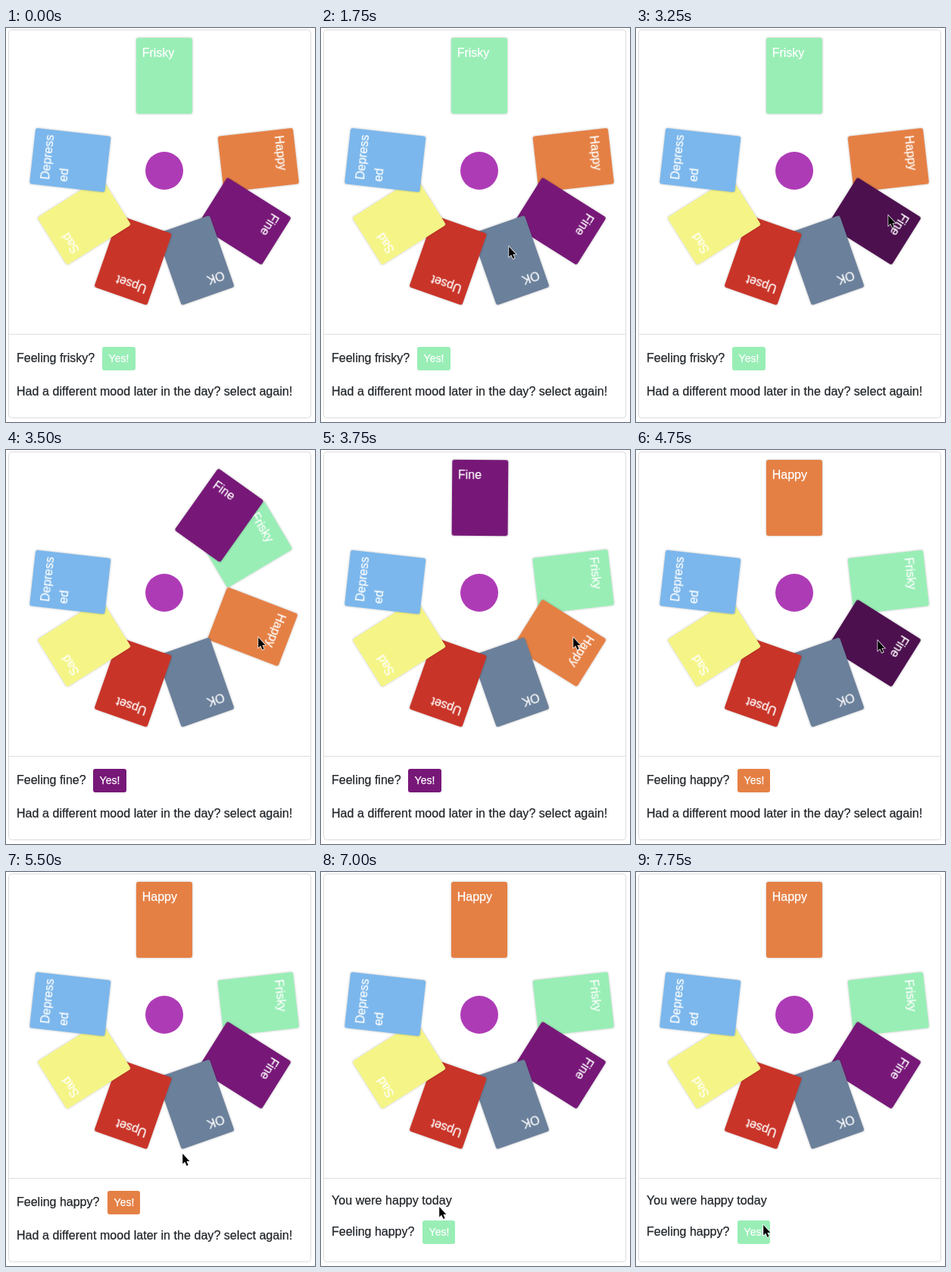
Write an HTML page that moves like this. It is 408 px wide and 519 px high and loops after 8000 ms.

```html
<!DOCTYPE html>
<html lang="en">
<head>
<meta charset="utf-8">
<title>Mood wheel</title>
<style>
  html, body { margin: 0; height: 100%; overflow: hidden; background: #fff; }
  svg { display: block; width: 100vw; height: 100vh; font: 16px "Liberation Sans", Arial, sans-serif; }
  text { fill: #212529; stroke: #212529; stroke-width: .25px; }
  .card { filter: drop-shadow(0 0 1.5px #0004); }
  .card text, #yes text { fill: #fff; stroke: #fff; }
  #note { letter-spacing: .05px; }
  #yes text { font-size: 14px; }
</style>
</head>
<body>
<svg viewBox="0 0 408 519">
  <rect x="3.5" y="2.5" width="399" height="511" rx="4" fill="#fff" stroke="#dcdcdc"/>
  <path d="M4 403.5H402" stroke="#dfdfdf"/>
  <circle cx="209" cy="188" r="25" fill="#ae3bb6"/>
  <g id="wheel"></g>
  <text id="note" x="14"></text>
  <text id="ask" x="14"></text>
  <g id="yes"><rect height="31" rx="3"/><text x="8.6" y="20">Yes!</text></g>
  <path id="cursor" d="M1.2 2V15.4L4.2 12.7 6.5 18 8.6 17.1 6.4 11.9H10.4Z"
    fill="#000" stroke="#fff" stroke-width="1.4" paint-order="stroke"/>
</svg>
<script>
const LOOP = 8000, STEP = 250, TURN = 500, FADE = 150;
const FINE = 2;
const moods = [
  ['Frisky', [153, 238, 182]], ['Happy', [229, 128, 69]], ['Fine', [119, 24, 120]],
  ['OK', [107, 128, 155]], ['Upset', [201, 52, 40]], ['Sad', [245, 245, 135]],
  ['Depress|ed', [123, 183, 236]]
];
// Left edge and width of the button after each question
const buttons = [[127, 44], [134, 43], [115, 44]];

// Each pick puts one card on top; the others keep their order around the wheel.
const picks = [
  { at: -LOOP, mood: 0, slots: [0, 1, 2] },
  { at: 3290, mood: 2, slots: [1, 2, 0] },
  { at: 4217, mood: 1, slots: [1, 0, 2] }
];
const SAVED = 7000;

// time, x, y
const trail = [
  [500, 223, 14], [750, 227, 34], [1000, 243, 237], [1250, 243, 251], [1500, 246, 285],
  [1750, 247, 286], [2750, 270, 287], [3000, 327, 250], [3250, 332, 245], [4000, 326, 248],
  [4250, 318, 249], [5000, 325, 206], [5250, 322, 205], [5500, 232, 369], [5750, 195, 404],
  [6000, 173, 426], [6250, 155, 439], [7750, 167, 463]
];

const $ = id => document.getElementById(id);
const set = (el, attrs) => { for (const k in attrs) el.setAttribute(k, attrs[k]); };
const clamp = v => Math.min(1, Math.max(0, v));
const mix = (a, b, p) => a + (b - a) * p;
const rgb = c => `rgb(${c.map(Math.round)})`;
const slotAngle = k => k ? 45 + 270 / 7 * k : 0;
const smooth = p => p * p * (3 - 2 * p);

// The CSS "ease" curve: cubic-bezier(.25, .1, .25, 1)
function ease(x) {
  const curve = (s, a, b) => 3 * (1 - s) ** 2 * s * a + 3 * (1 - s) * s * s * b + s ** 3;
  let lo = 0, hi = 1;
  for (let i = 0; i < 30; i++) {
    const s = (lo + hi) / 2;
    if (curve(s, .25, .25) < x) lo = s; else hi = s;
  }
  return curve(hi, .1, 1);
}

$('wheel').innerHTML = moods.map(([name, color]) =>
  `<g class="card"><rect x="172" y="13" width="74" height="100" rx="3" fill="${rgb(color)}"/>` +
  name.split('|').map((s, i) => `<text x="179.7" y="${38 + 24 * i}">${s}</text>`).join('') + '</g>'
).join('');
const cards = [...$('wheel').children];

function draw(t) {
  const n = picks.findLastIndex(p => p.at <= t);
  const now = picks[n], before = picks[Math.max(0, n - 1)];
  const turn = ease(clamp((t - now.at) / TURN));
  cards.forEach((card, i) => {
    const angle = mix(slotAngle(before.slots[i] ?? i), slotAngle(now.slots[i] ?? i), turn);
    set(card, { transform: `rotate(${angle} 209 188)` });
  });

  const hovered = t >= 3000 && t < 3290 || t >= 4717 && t < 5000;
  set(cards[FINE].firstChild, { fill: hovered ? '#4d104f' : rgb(moods[FINE][1]) });

  const saved = t >= SAVED;
  const fade = smooth(clamp((t - now.at) / FADE));
  const from = moods[before.mood][1], to = moods[now.mood][1];
  const color = saved ? moods[0][1] : from.map((v, i) => mix(v, to[i], fade));
  const name = moods[now.mood][0].toLowerCase();
  $('ask').textContent = `Feeling ${name}?`;
  $('note').textContent = saved ? `You were ${name} today`
    : 'Had a different mood later in the day? select again!';
  set($('ask'), { y: saved ? 479 : 440 });
  set($('note'), { y: saved ? 438 : 484 });

  const [x, width] = buttons[now.mood];
  set($('yes'), { transform: `translate(${x} ${saved ? 459 : 420})` });
  set($('yes').firstChild, { width, fill: rgb(color) });

  const spot = trail.findLast(p => p[0] <= t);
  set($('cursor'), spot
    ? { visibility: 'visible', transform: `translate(${spot[1]} ${spot[2]})` }
    : { visibility: 'hidden' });
}

const start = performance.now();
function tick() {
  const t = (performance.now() - start) % LOOP;
  draw(Math.floor(t / STEP) * STEP);
  requestAnimationFrame(tick);
}
tick();
</script>
</body>
</html>
```
